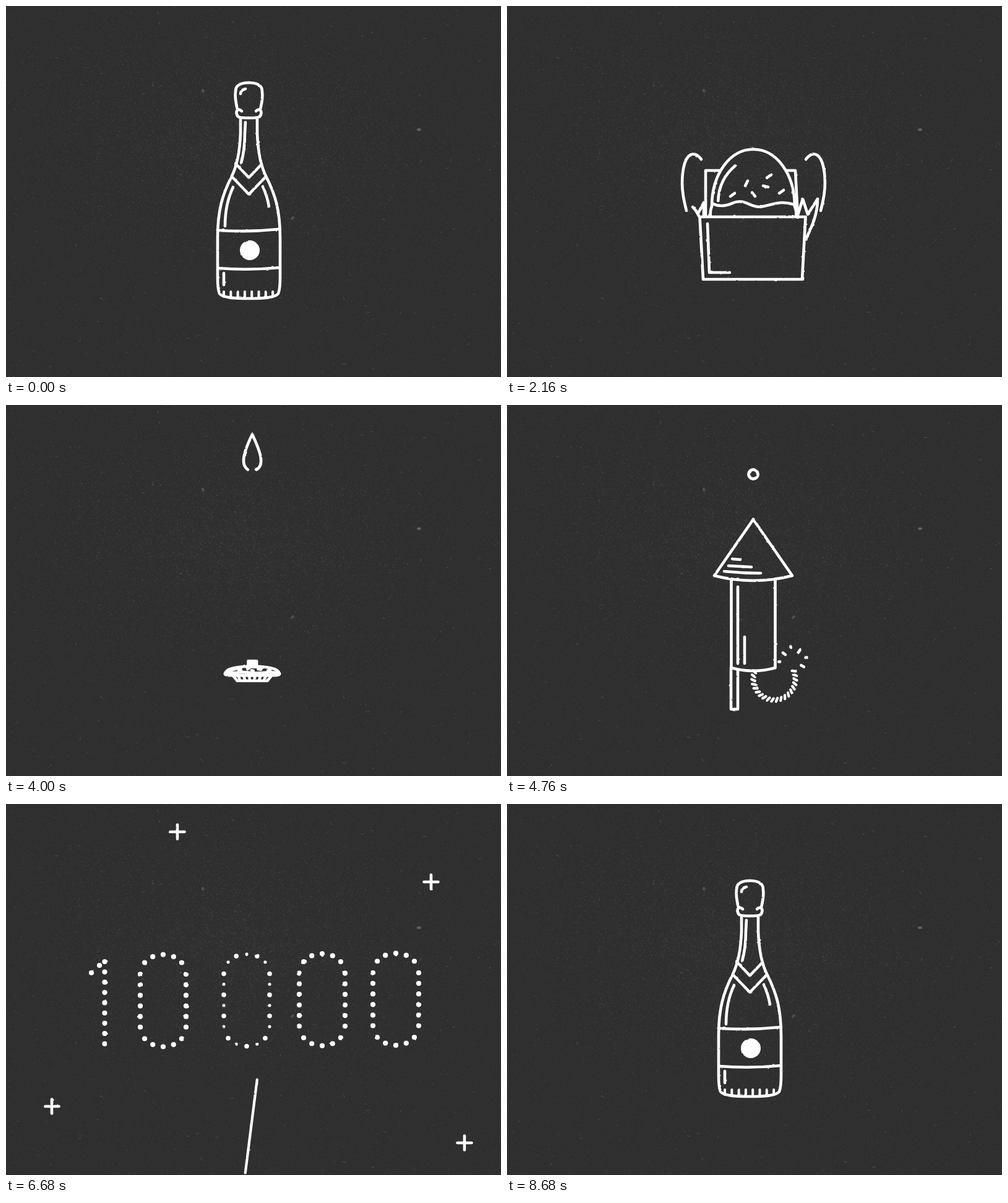
An HTML page with a canvas for the animation above (9.04 s loop, 800 px wide and 600 px high).

```html
<!DOCTYPE html>
<html lang="en">
<head>
<meta charset="utf-8">
<title>Celebration</title>
<style>
html, body { margin: 0; width: 800px; height: 600px; overflow: hidden; background: #2f2f2f; }
canvas, svg { position: absolute; left: 0; top: 0; }
#ink { filter: url(#rough); }
</style>
</head>
<body>
<svg width="0" height="0">
  <filter id="rough" x="0" y="0" width="1" height="1" color-interpolation-filters="sRGB">
    <feTurbulence type="fractalNoise" baseFrequency="0.12" numOctaves="2" seed="4" result="n"/>
    <feDisplacementMap in="SourceGraphic" in2="n" scale="2" xChannelSelector="R" yChannelSelector="G"/>
  </filter>
</svg>
<canvas id="paper" width="800" height="600"></canvas>
<canvas id="ink" width="800" height="600"></canvas>
<script>
const LOOP = 9040, STEP = 40, WIDTH = 4.6;
const ctx = document.getElementById('ink').getContext('2d');

// ---- timing ----
const { sin, cos, PI } = Math;
const lerp = (a, b, k) => a + (b - a) * k;
const span = (t, a, b) => Math.max(0, Math.min(1, (t - a) / (b - a)));
const ease = (t, a, b) => (1 - cos(PI * span(t, a, b))) / 2;
const bump = (t, a, b) => sin(PI * span(t, a, b));

// Grows from 0 to 1 with a decaying overshoot
function pop(t, start, time, damp = 5) {
  const k = span(t, start, start + time);
  return 1 - (1 - k) ** damp * cos(3 * PI * k);
}
const squash = p => ({ sx: 1 + (1 - p) * .3, sy: p });

// ---- drawing ----
const still = new DOMMatrix();
function pose(x, y, { dx = 0, dy = 0, rot = 0, sx = 1, sy = 1 } = {}) {
  return new DOMMatrix().translate(x + dx, y + dy).rotate(rot).scale(sx, sy).translate(-x, -y);
}
const mirror = (m, axis) => m.multiply(new DOMMatrix([-1, 0, 0, 1, 2 * axis, 0]));

function shape(d, m) {
  const p = new Path2D();
  p.addPath(new Path2D(d), m);
  return p;
}
function draw(d, m = still, width = WIDTH) {
  ctx.lineWidth = width;
  ctx.stroke(shape(d, m));
}
function both(d, m, axis) {
  draw(d, m);
  draw(d, mirror(m, axis));
}
function cut(d, m = still) {
  ctx.globalCompositeOperation = 'destination-out';
  ctx.fill(shape(d, m));
  ctx.globalCompositeOperation = 'source-over';
}
function dot(x, y, r) {
  ctx.beginPath();
  ctx.arc(x, y, r, 0, 7);
  ctx.fill();
}
const seg = (x1, y1, x2, y2) => `M${x1} ${y1} L${x2} ${y2} `;
const dash = (x, y, half, a) =>
  seg(x - half * cos(a), y - half * sin(a), x + half * cos(a), y + half * sin(a));

// Joins the path pieces made by fn(0) ... fn(n - 1)
const repeat = (n, fn) => Array.from({ length: n }, (_, i) => fn(i)).join('');

// ---- bottle ----
const BOTTLE_HALF = `M392.5 124 C380 124 371 128 371 138 C370 145 371 155 374 167
 M381 170 C376 165 371 169 373 175 C374 180 377 181 392.5 181
 M379 183 V205 C378 235 374 258 364 277 C350 305 342 330 342 375 V440
 C342 452 343 460 345 465 C350 472 370 473 392.5 473
 M373 257 L392 277 M366 277 L392 304`;
const BOTTLE_LINES = `M345 363 Q392 366 440 361 M343 424 Q392 428 443 423
 M379 142 C379 137 383 135 387 134 M387 188 L386 205 C386 225 384 240 380 254
 M367 293 C358 312 354 335 354 356 M415 292 Q422 307 425 324 M352 432 V451`;
const FEET = repeat(8, i => seg(352 + i * 11.3, 462, 352 + i * 11.3, 470));

function bottle(t) {
  const move = t > 8000 ? squash(pop(t, 8120, 560)) : {
    rot: -12 * sin(4 * PI * span(t, 0, 800)),
    sx: 1 + .2 * bump(t, 760, 960),
    sy: 1 - .8 * ease(t, 760, 960)
  };
  const m = pose(392, 473, move);
  both(BOTTLE_HALF, m, 392.5);
  draw(BOTTLE_LINES, m);
  draw(FEET, m, 4);
  ctx.fill(shape('M378 395 A16 16 0 1 1 410 395 A16 16 0 1 1 378 395 Z', m));
}

// ---- gift ----
const LID_HALF = 'M396.5 289 H297 V334 H396.5 M380 289 V334';
const BODY_HALF = 'M396.5 334 H307.5 V441 H396.5 M380 334 V441';
const BOW_HALF = `M312 286 C306 268 307 248 319 238 C332 227 356 227 372 237 C383 245 389 255 392.5 264
 M314 248 C333 246 352 262 369 288 M322 250 Q325 271 343 288 M333 252 Q338 271 356 288
 M308 269 L289 265 L300 276 L292 290 L308 285`;

function gift(t) {
  const p = pop(t, 960, 240), crouch = .14 * sin(2 * PI * span(t, 1240, 1600));
  const m = pose(396, 441, { sx: 1 + (1 - p) * .3 + crouch, sy: p - crouch });
  both(BODY_HALF, m, 396.5);
  draw('M320 345 V430 H361', m);

  const gone = ease(t, 1640, 1840), jump = span(t, 1380, 1840);
  const top = m.multiply(pose(392, 300, {
    dy: -98 * sin(jump * PI * .75), rot: -6 * sin(jump * 2 * PI),
    sx: 1 + gone * .6, sy: 1 - gone * .95
  }));
  both(LID_HALF, top, 396.5);
  both(BOW_HALF, top, 392.3);
  draw('M308 298 V325 H364', top);
}

// ---- cupcake ----
const DOME_HALF = 'M326 363 C326 328 357 300 398 300';
const BASE_HALF = 'M326 363 C320 378 325 391 337 391 H398';
const ICING = 'M328 363 C340 369 352 366 362 362 C382 354 392 368 408 368 C425 368 440 356 468 364';
const SPRINKLES = `M385 330 L389 322 M420 317 L427 312 M414 330 L422 332
 M440 342 L447 337 M361 347 L368 342 M396 341 L401 347`;

function cake(m, stretch) {
  const thin = 1 - .07 * stretch;
  const dome = m.multiply(pose(398, 363, { sx: thin, sy: 1 + .46 * stretch }));
  cut(DOME_HALF + 'V391', dome);
  cut(DOME_HALF + 'V391', mirror(dome, 398));
  both(DOME_HALF, dome, 398);
  draw('M337 357 C338 340 350 327 367 318', dome);
  both(BASE_HALF, m.multiply(pose(398, 391, { sx: thin })), 398);
  draw(ICING, m.multiply(pose(398, 363, { sx: thin, dy: -4 * stretch })));
  draw(SPRINKLES, m);
}

// Boxes as centre, half width at top and bottom, top, bottom
const CLOSED = [396.5, 89, 89, 334, 441];
const OPEN = [397, 85.5, 80, 341, 442];
const WRAPPER = [398, 53, 41, 392, 446];

const blend = (a, b, k) => a.map((v, i) => lerp(v, b[i], k));
const box = ([c, a, b, y1, y2]) => `M${c - a} ${y1} H${c + a} L${c + b} ${y2} H${c - b} Z`;
const ribs = k => repeat(6, i => {
  const x = 360.5 + i * 14.8;
  return seg(x, 400, x + (398 - x) * .11 * k, 400 + 37 * k);
});

function unbox(t) {
  const wrap = ease(t, 2320, 2560), arc = bump(t, 1880, 2440), away = t - 2160;
  const front = box(blend(blend(CLOSED, OPEN, ease(t, 1840, 2080)), WRAPPER, wrap));
  if (arc > .02) {
    const side = pose(290, 290, { dx: -away * .14, sx: arc, sy: arc });
    const right = mirror(still, 398.5).multiply(side);
    for (const m of [side, right])
      draw('M314 248 C302 232 288 238 284 270 C281 295 286 315 290 331', m);
    draw('M321 341 V266 H466 L470 341', pose(396, 341, { sy: arc }));
  }
  if (Math.abs(away) < 160) {
    const m = pose(398, 341, { dy: away * .3 });
    draw(`M303 327 L311 341 M300 325 L309 335 L318 318 V338
     M470 338 L478 312 L486 337 L502 312 C502 340 490 362 483 377`, m);
  }
  const dy = 130 * (1 - ease(t, 1840, 2100)) - 46 * bump(t, 1900, 2700);
  cake(pose(398, 391, { dy }), bump(t, 1840, 2480));
  if (wrap < 1) cut(front);
  draw(front);
  if (wrap < .4) draw('M324 352 L327 431 H360');
  if (t > 2480) draw(ribs(span(t, 2480, 2680)));
}

// ---- candle ----
const STRIPES = 'M387 248 H410 V306 H387 Z M388 262 L400 250 M397 306 L409 296'
  + repeat(3, i => seg(388, 275 + i * 14, 409, 255 + i * 14));

function candle(t) {
  const m = pose(398, 446, { sx: 1 - .5 * ease(t, 3800, 4080), sy: 1 - .95 * ease(t, 3720, 4080) });
  if (t < 4080) {
    cake(m, 0);
    draw(box(WRAPPER), m);
    draw(ribs(1), m);
    const stick = m.multiply(pose(398, 306, { sy: pop(t, 2720, 400) }));
    cut('M385 290 H412 V304 H385 Z', m);
    cut('M387 248 H410 V306 H387 Z', stick);
    draw(STRIPES, stick);
    draw('M383 309 Q398 303 416 310', m);
  }
  const lit = pop(t, 2960, 360, 3) * (1 - ease(t, 4240, 4640));
  if (lit > .03) {
    const rot = 7 * sin((t - 3320) / 75) * bump(t, 3080, 3680);
    const dy = -150 * ease(t, 3720, 4080) + 22 * ease(t, 4080, 4640);
    draw('M391 237 C379 229 383 211 398 180 C412 210 418 229 405 237', pose(398, 240, { dy, rot, sx: lit, sy: lit }));
    if (t < 3800) draw('M398 234 V247', m);
  }
  const wave = bump(t, 3140, 3500), out = (t - 3320) * .07;
  if (wave > .03) {
    draw('M327 213 Q322 225 328 238 M338 204 Q331 222 341 243', pose(333, 224, { dx: -out, sy: wave }));
    draw('M456 204 Q461 218 456 234 M470 209 Q472 218 471 229', pose(463, 219, { dx: out, sy: wave }));
  }
}

// ---- rocket ----
const ROCKET_HALF = 'M398 185 L335 276 Q366 284 398 284 M362.5 281 V425 Q380 430 398 430';
const ROCKET_LINES = `M364 249 L377 250 M358 260 L395 262 M351 269 Q380 272 410 272
 M362 425 V492 H373 V428 M373 294 V418 M384 375 V418`;

// Rope arc: k = 0 at the rocket, 1 at the free end
const ropeAngle = k => lerp(200, -22, k) * PI / 180;
const fuse = len => repeat(Math.ceil(20 * len), i => {
  const a = ropeAngle(i / 19);
  return dash(432 + 34 * cos(a), 443 + 34 * sin(a), 3, a + .5);
});
const sparks = (t, len) => repeat(6, i => {
  const a = (i * 43 - 185) * PI / 180, end = ropeAngle(len);
  const r = (i % 2 ? 18 : 22) + 3 * sin((t - 4760) / 25);
  return dash(430.5 + 34 * cos(end) + r * cos(a), 426 + 34 * sin(end) + r * sin(a), i % 2 ? 2.6 : 1, a);
});

function rocket(t) {
  const crouch = .1 * bump(t, 5520, 5760), shape = squash(pop(t, 4040, 520));
  const m = pose(398, 492, {
    sx: shape.sx + crouch, sy: shape.sy - crouch,
    dx: 30 * crouch * cos(t / STEP * PI),
    dy: -720 * span(t, 5660, 5960) ** 2
  });
  both(ROCKET_HALF, m, 398);
  draw(ROCKET_LINES, m);
  if (t > 5680) draw(repeat(3, i => seg(380 + i * 18, 445, 380 + i * 18, 500 + i % 2 * 45)), m);

  const rope = ease(t, 4360, 4560) * (1 - span(t, 4760, 5480));
  if (rope > 0) draw(fuse(rope), still, 4.2);
  if (t >= 4600 && t < 5520) draw(sparks(t, rope));
  const ring = span(t, 4640, 4920);
  if (ring > 0 && ring < 1) {
    ctx.lineWidth = 5.2 * Math.min(1, 1.7 * (1 - ring));
    ctx.beginPath();
    ctx.arc(398, 112, 2.3 + 12 * ring, 0, 7);
    ctx.stroke();
  }
}

// ---- number in dots ----
function zero(cx) {
  const pts = [], lift = (cx - 254) * .006;
  const side = (dir, i) => pts.push([cx + 37 * dir, 318 - lift + dir * (i - 2.5) * 17.1]);
  const cap = (dir, i) => {
    const a = (i - 2) * 27 * PI / 180;
    pts.push([cx - dir * 37 * sin(-a), 318 - lift + dir * (43 + 31.5 * cos(a))]);
  };
  for (const dir of [1, -1]) {
    for (let i = 0; i < 6; i++) side(dir, i);
    for (let i = 0; i < 5; i++) cap(dir, 4 - i);
  }
  return pts;
}
const one = [[138, 273], [151, 261]];
for (let i = 0; i < 9; i++) one.push([159.5, 255 + i * 16.6]);
const DIGITS = [154, 254, 389, 511, 630].map((x, i) => ({ x, pts: i ? zero(x) : one }));
const PLUSES = [[277, 45], [687, 126], [74, 489], [741, 548]];

function streak(t, start, x1, x2, y2) {
  const p = (t - start) / 200, tail = span(p, .454, 1.454), head = span(p, 0, 1);
  if (p > 0 && tail < 1)
    draw(seg(lerp(x1, x2, tail), lerp(650, y2, tail), lerp(x1, x2, head), lerp(650, y2, head)), still, 4.2);
}

function fireworks(t) {
  DIGITS.forEach(({ x, pts }, n) => {
    const born = 6080 + n * 80, wink = 6680 + (n + 3) % 5 * 160;
    streak(t, born - 220, lerp(400, x, .75), x, 318);
    if (t < born) return;
    const k = 1 - (1 - span(t, born, born + 240)) ** 3;
    const size = 4.1 * (1 - ease(t, 7560 + n * 40, 7840 + n * 40));
    const dim = Math.exp(-(((t - wink) / 90) ** 2));
    pts.forEach(([px, py], i) =>
      dot(lerp(x, px, k), lerp(318, py, k), size * (1 - dim * (i % 2 ? .38 : .08))));
  });
  for (let i = 0; i < 4; i++) {
    const x = 380 + 150 * sin(i * 2);
    streak(t, 6557 + i * 300, x, x + 42, 318 - i * 45);
  }
  PLUSES.forEach(([x, y], i) => {
    const late = t - i * 40, gone = ease(late, 7600, 7840);
    const size = pop(late, 6280, 260) * (1 - gone);
    const rot = 90 * (ease(late, 6280, 6540) + gone);
    if (size > .02) draw(dash(x, y, 11.5, 0) + dash(x, y, 11.5, PI / 2), pose(x, y, { sx: size, sy: size, rot }));
  });
}

// ---- grainy paper ----
function paper() {
  const c = document.getElementById('paper').getContext('2d');
  let seed = 11;
  const rnd = () => (seed = seed * 16807 % 2147483647) / 2147483647;
  const spread = () => rnd() + rnd() - 1;
  const white = a => `rgba(255,255,255,${a})`;
  c.fillStyle = '#2f2f2f';
  c.fillRect(0, 0, 800, 600);
  for (let i = 0; i < 32000; i++) {
    const near = i % 2;
    const x = near ? 370 + spread() * 370 : rnd() * 800;
    const y = near ? 230 + spread() * 230 : rnd() * 600;
    c.fillStyle = white(.02 + rnd() ** 2 * .1);
    c.fillRect(x | 0, y | 0, 1, 1);
  }
  c.lineCap = 'round';
  const fleck = (x, y, len, a, alpha) => {
    c.strokeStyle = white(alpha);
    c.beginPath();
    c.moveTo(x, y);
    c.lineTo(x + len * cos(a), y + len * sin(a));
    c.stroke();
  };
  for (let i = 0; i < 320; i++) fleck(rnd() * 800, rnd() * 600, rnd() ** 3 * 5, rnd() * 6, .06 + rnd() * .13);
  c.lineWidth = 4;
  fleck(666, 200, 3, 0, .24);
  fleck(318, 136, 2, 1.3, .15);
  fleck(462, 344, 3, -.8, .14);
}

// ---- loop ----
const SCENES = [
  [0, 960, bottle], [1000, 1840, gift], [1840, 2760, unbox], [2760, 4640, candle],
  [4080, 5960, rocket], [5840, 8000, fireworks], [8160, LOOP, bottle]
];
const begin = performance.now();
let last = -1;
function frame() {
  const t = Math.floor((performance.now() - begin) % LOOP / STEP) * STEP;
  if (t !== last) {
    last = t;
    ctx.clearRect(0, 0, 800, 600);
    for (const [from, to, scene] of SCENES) if (t >= from && t < to) scene(t);
  }
  requestAnimationFrame(frame);
}
ctx.strokeStyle = ctx.fillStyle = '#fff';
ctx.lineCap = ctx.lineJoin = 'round';
paper();
frame();
</script>
</body>
</html>
```
